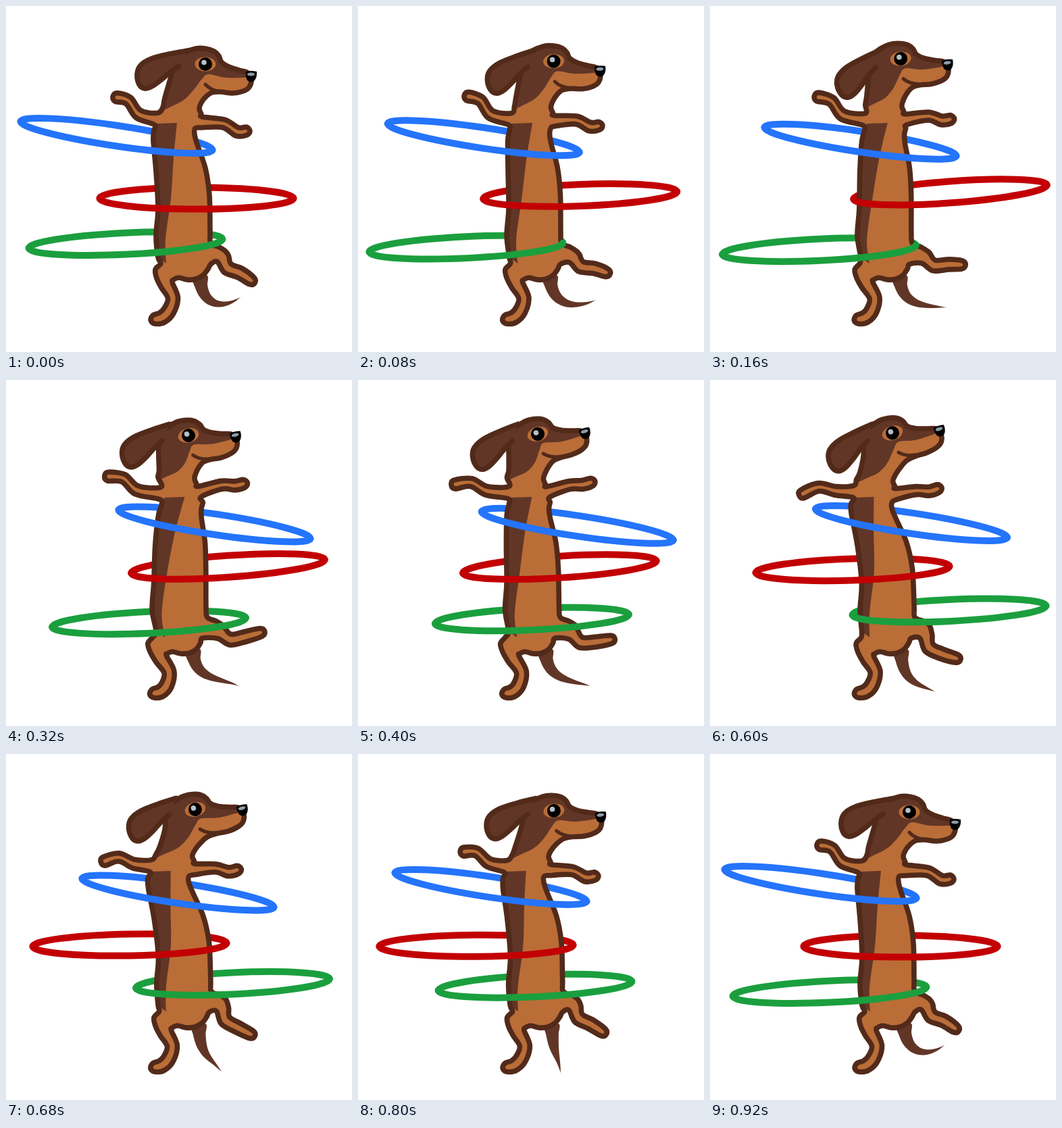
An HTML page that plays this animation: 512x512 px, repeating every 0.96 s.

```html
<!DOCTYPE html>
<html lang="en">
<head>
<meta charset="utf-8">
<title>Hula hoop dachshund</title>
<style>
  html, body { margin: 0; width: 100%; height: 100%; overflow: hidden; background: #fff; }
  svg { display: block; width: 100vw; height: 100vh; }
  path { stroke-linejoin: round; stroke-linecap: round; }
</style>
</head>
<body>
<svg id="stage" viewBox="0 0 512 512"></svg>
<script>
const LOOP = 960, STEP = 40, CYCLE = 920;
const KEYS = [0, 160, 320, 520, 600, 680, 800];
const TAN = '#ba6d37', LINE = '#522a1a', DARK = '#613627';

// The whole dance: swing carries the body left, lean pushes the chest out.
const MOVES = {
  swing: [0, 0.4, 0.78, 1, 0.78, 0.47, 0.16],
  lean: [0, 0.72, 1, 0, -0.19, -0.27, -0.16],
  nod: [0, -7.5, -13, -19, -17.4, -14, -7.3],
  bob: [0, -8, -4, -10, -7.6, -4, -2],
  tipX: [347, 349, 345, 343, 333, 319, 300],
  tipY: [431, 446, 453, 453, 461, 470, 472],
  tipAim: [-35, 5, 24, 2, 22, 50, 80],
  blue: [163.5, 222.5, 308.5, 328.5, 298, 254.5, 196.5],
  red: [282, 355.5, 328.5, 245, 211, 183, 175],
  redTilt: [0, -4.2, -4, -2.8, -1.9, -1, -0.4],
  green: [177, 161.5, 211.5, 331, 354, 335.5, 262]
};

const HOOPS = [
  { color: '#2474fc', ry: 15.2, place: m => [m.blue, 192 + 0.148 * (m.blue - 163.5), 8.5] },
  { color: '#c20004', ry: 16, place: m => [m.red, 284.6 + 2.2 * m.redTilt, m.redTilt] },
  { color: '#1b9f3e', ry: 16, place: m => [m.green, 350.5 + 11 * Math.cos(2 * Math.PI * (m.t - 215) / CYCLE), -2.7] }
];

// Joints from root to tip: x, y, half width, travel with swing (x, y), travel with lean (x, y).
const ARM_L = [
  [222, 167, 9, -9, -2, 13, 2], [196, 160, 6.5, -11, 5, 6, -1],
  [181, 140, 6, -23, 21, 11, -11], [163, 135, 6.5, -31, 38, 12, -22]
];
const ARM_R = [
  [290, 172, 8, -16, -5, 9, -3], [322, 174, 6, -19, -15, 12, -7],
  [342, 186, 6.5, -20, -29, 12, -7], [356, 185, 6, -20, -33, 12, -6]
];
const LEG_R = [
  [321, 374, 9.5, -2, 6, -1, -4], [328, 388, 8, -3, 8, 7, -10],
  [346, 395, 7.5, -1, 8, 11, -22], [364, 407, 6, 5, -1, 10, -33]
];
const LEG_L = [[238, 413, 9], [247, 432, 7.5], [241, 451, 8], [231, 461, 8], [219, 464, 6.5]];

const pts = s => s.split(' ').map(p => p.split(',').map(Number));
const CROWN = pts('232,150 235,136 244,105 252,80 262,70 281,63 295,63 308,67 315,74 319,83 330,90 345,95 358,99');
const JAW = pts('363,108 360,120 351,126 335,129 318,127 305,128 296,134 289,143 286,152 289,160');
const CHEEK = pts('356,106 325,106 300,101 290,108 277,125 263,139 246,148 230,156');
const SIDE_R = pts('280,181 279,190 283,205 295,240 301,280 302,335 303,351 316,357 325,363');
const SIDE_L = pts('225,372 222,340 225,300 222,245 218,200 219,184');
const BACK = pts('253,173 248,225 244,285 236,345 237,381');
const BELLY = pts('303,382 299,389 292,398 281,404 268,405 256,402 248,405');
const HIP = pts('223,403 221,390 229,381');

const clamp = v => Math.max(0, Math.min(1, v));

// Cyclic cubic through the key values.
function at(vals, t) {
  const n = KEYS.length;
  const v = k => vals[(k + n) % n];
  const time = k => KEYS[(k + n) % n] + CYCLE * Math.floor(k / n);
  const slope = k => (v(k + 1) - v(k - 1)) / (time(k + 1) - time(k - 1));
  t %= CYCLE;
  let i = n - 1;
  while (t < KEYS[i]) i--;
  const d = time(i + 1) - time(i), s = (t - time(i)) / d, r = 1 - s;
  return r * r * (1 + 2 * s) * v(i) + s * s * (3 - 2 * s) * v(i + 1)
    + d * s * r * (r * slope(i) - s * slope(i + 1));
}

// The spine bends more the higher it gets.
function sway([x, y], m) {
  const k = Math.min(1, (360 - y) / 175);
  return [x - (1 + 8 * k * k) * m.swing + (39 * k * k - 17 * k - 3.5) * m.lean, y];
}

// The standing leg pivots over its foot.
function plant([x, y, w], m) {
  return [x - (7 * m.swing + 5 * m.lean) * (475 - y) / 80, y, w];
}

function travel([x, y, w, sx, sy, lx, ly], m) {
  return [x + sx * m.swing + lx * m.lean, y + sy * m.swing + ly * m.lean, w];
}

// The head turns about the eye; the neck blends it into the chest.
function turn([x, y], m) {
  const a = m.nod * Math.PI / 180, c = Math.cos(a), s = Math.sin(a), dx = x - 295, dy = y - 86;
  const hx = 295 - 32 * m.swing + dx * c - dy * s, hy = 86 + m.bob + dx * s + dy * c;
  const nx = x - 18 * m.swing + 7 * m.lean, ny = y - 4 * m.swing - 3 * m.lean;
  const k = clamp((y - 100) / 50) * clamp((330 - x) / 40);
  return [hx + (nx - hx) * k, hy + (ny - hy) * k];
}

// Outline of a tapered chain: out along one side, round the tip, back along the other.
function limb(joints, tip = 5) {
  const n = joints.length - 1, out = [], back = [];
  joints.forEach(([x, y, w], i) => {
    const a = joints[Math.max(0, i - 1)], b = joints[Math.min(n, i + 1)];
    const len = Math.hypot(b[0] - a[0], b[1] - a[1]);
    const ux = (b[0] - a[0]) / len, uy = (b[1] - a[1]) / len;
    out.push([x + uy * w, y - ux * w]);
    back.unshift([x - uy * w, y + ux * w]);
    if (i === n && tip) out.push([x + ux * tip, y + uy * tip]);
  });
  return [...out, ...back];
}

function tailShape(m) {
  const a = m.tipAim * Math.PI / 180, x0 = 287 - 7 * m.swing - 5 * m.lean;
  const px = [x0, x0 + 2, m.tipX - 32 * Math.cos(a), m.tipX];
  const py = [400, 445, m.tipY - 32 * Math.sin(a), m.tipY];
  const bez = (p, u) => (1 - u) ** 3 * p[0] + 3 * u * (1 - u) ** 2 * p[1] + 3 * u * u * (1 - u) * p[2] + u ** 3 * p[3];
  const joints = Array.from({ length: 9 }, (_, i) => [bez(px, i / 8), bez(py, i / 8), 10.5 * (1 - i / 8) ** 0.9]);
  return limb(joints, 0);
}

const pair = p => `${p[0].toFixed(2)},${p[1].toFixed(2)}`;

function smooth(p, closed) {
  const n = p.length;
  const q = i => closed ? p[(i + n) % n] : p[Math.max(0, Math.min(n - 1, i))];
  const handle = (b, a, c, k) => pair([b[0] + (c[0] - a[0]) * k, b[1] + (c[1] - a[1]) * k]);
  let d = 'M' + pair(p[0]);
  for (let i = 0; i < (closed ? n : n - 1); i++) {
    const b = q(i), c = q(i + 1);
    d += `C${handle(b, q(i - 1), c, 1 / 6)} ${handle(c, b, q(i + 2), -1 / 6)} ${pair(c)}`;
  }
  return d + (closed ? 'Z' : '');
}

// A patch has one soft inner edge; its other edge hides under the outline.
const patch = (inner, outer) => smooth(inner, false) + 'L' + outer.map(pair).join('L') + 'Z';

const stage = document.getElementById('stage');
function add(tag, attrs, parent = stage) {
  const el = document.createElementNS('http://www.w3.org/2000/svg', tag);
  for (const k in attrs) el.setAttribute(k, attrs[k]);
  return parent.appendChild(el);
}
const halfHoop = (h, sweep) => add('path', {
  d: `M-143.5,0A143.5,${h.ry} 0 0 ${sweep} 143.5,0`, fill: 'none', stroke: h.color, 'stroke-width': 10
});

const backs = HOOPS.map(h => halfHoop(h, 1));
const [tail, skin, back, face] = [DARK, TAN, DARK, DARK].map(fill => add('path', { fill }));
const ink = { fill: 'none', stroke: LINE, 'stroke-width': 7.6 };
const outline = add('path', ink);
const ear = add('path', {
  ...ink, fill: DARK,
  d: smooth(pts('269,66 242,71 215,78 199,88 194,101 197,116 205,122 216,119 230,109 244,97 256,89'), false)
});
const head = add('g', {});
add('path', { ...ink, 'stroke-width': 5, d: 'M295,116Q303,125 318,127' }, head);
add('ellipse', { cx: 295, cy: 86, rx: 15.5, ry: 10.5, fill: TAN }, head);
add('circle', { cx: 295, cy: 86, r: 10 }, head);
add('circle', { cx: 293, cy: 83.5, r: 3.8, fill: '#b5c0c8' }, head);
add('path', { d: 'M355,97Q363,95 371,97Q372,106 367,111Q362,114 357,110Q354,104 355,97Z' }, head);
add('ellipse', { cx: 362.5, cy: 101, rx: 5.5, ry: 2.5, fill: '#8f9ba6' }, head);
const fronts = HOOPS.map(h => halfHoop(h, 0));

function draw(t) {
  const m = { t };
  for (const k in MOVES) m[k] = at(MOVES[k], t);
  const pose = (list, rule) => list.map(p => rule(p, m));
  const arm = list => limb(pose(list, travel));

  const crown = pose(CROWN, turn), sideL = pose(SIDE_L, sway);
  const body = smooth([
    ...crown, ...pose(JAW, turn), ...arm(ARM_R), ...pose(SIDE_R, sway), ...arm(LEG_R),
    ...pose(BELLY, plant), ...limb(pose(LEG_L, plant)), ...pose(HIP, plant), ...sideL, ...arm(ARM_L)
  ], true);
  skin.setAttribute('d', body);
  outline.setAttribute('d', body);
  tail.setAttribute('d', smooth(tailShape(m), true));
  back.setAttribute('d', patch(pose(BACK, sway), [...sideL, sway([223, 174], m)]));
  face.setAttribute('d', patch(pose(CHEEK, turn), crown));

  const shift = `translate(${-32 * m.swing} ${m.bob})`;
  head.setAttribute('transform', `${shift} rotate(${m.nod} 295 86)`);
  ear.setAttribute('transform', `${shift} rotate(${1.8 * m.bob} 295 86)`);

  HOOPS.forEach((h, i) => {
    const [x, y, tilt] = h.place(m);
    for (const half of [backs[i], fronts[i]])
      half.setAttribute('transform', `translate(${x} ${y}) rotate(${tilt})`);
  });
}

const start = performance.now();
function tick() {
  const t = (performance.now() - start) % LOOP;
  draw(Math.floor(t / STEP) * STEP);
  requestAnimationFrame(tick);
}
tick();
</script>
</body>
</html>
```
